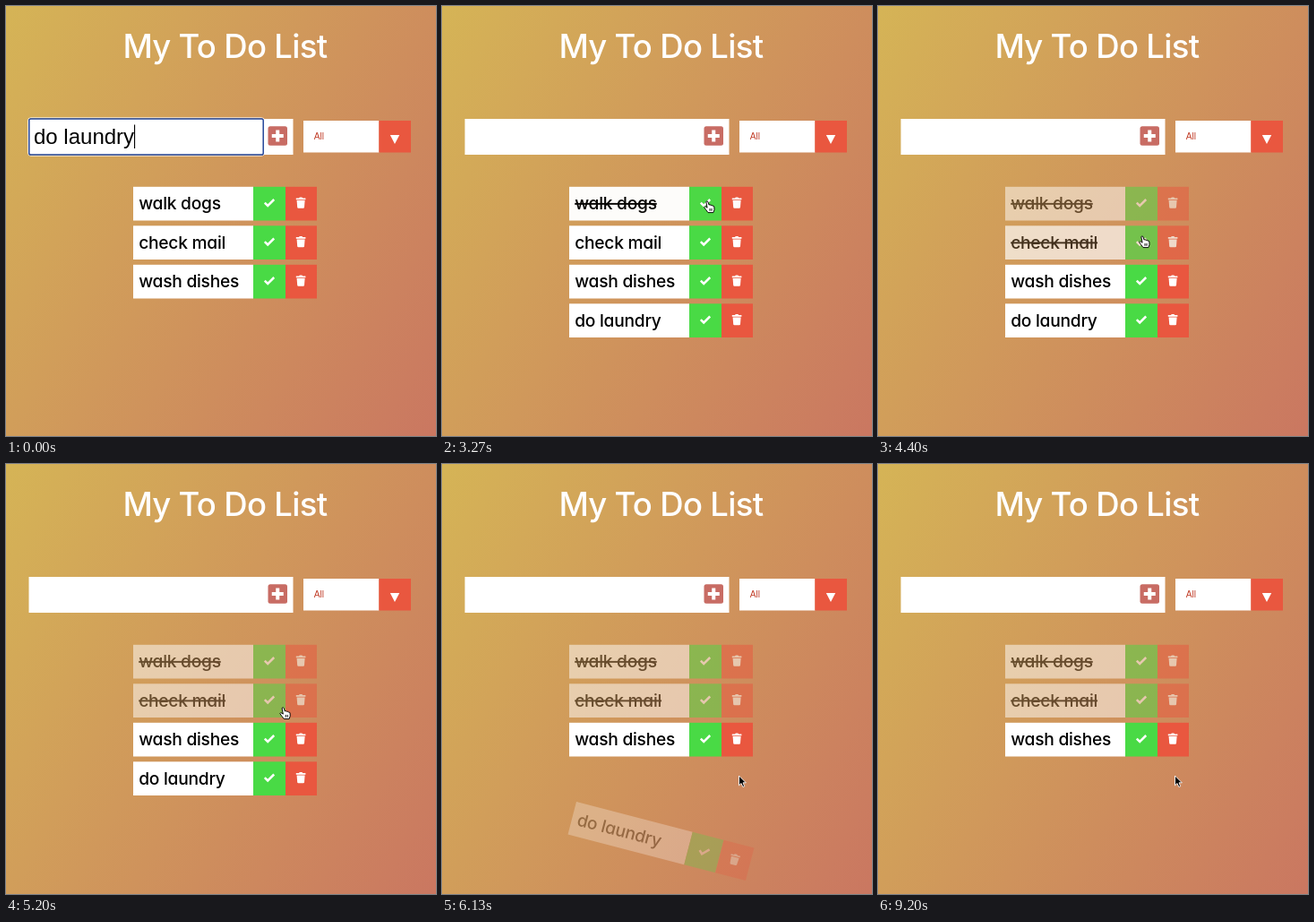
These frames come from a looping animation (480x480 px, 9.94 s). An HTML page:

```html
<!DOCTYPE html>
<html lang="en">
<head>
<meta charset="utf-8">
<title>My To Do List</title>
<style>
  html, body { margin: 0; width: 100%; height: 100%; overflow: hidden; }
  body { background: linear-gradient(120deg, #d5b456, #ca7761); }
  svg { display: block; width: 100%; height: 100%; }
  text { white-space: pre; }
  .round {
    font-family: Inter, "Open Sans", sans-serif;
    font-feature-settings: "cv11";
    font-optical-sizing: none;
    font-weight: 500;
  }
  .title { font-size: 36.5px; letter-spacing: -.7px; fill: #fff; text-anchor: middle; }
  .label { font-size: 19.2px; letter-spacing: -.25px; fill: #000; }
  .done .label { text-decoration: line-through; }
  .plain { font-family: "Liberation Sans", Arial, sans-serif; }
</style>
</head>
<body>
<svg viewBox="0 0 480 480">
  <defs>
    <g id="row">
      <rect width="134" height="37.7" fill="#fff"/>
      <rect x="134" width="36" height="37.7" fill="#49da45"/>
      <rect x="170" width="35" height="37.7" fill="#e9573f"/>
      <path d="M146.8 17.8L150.2 21.1L157.2 14.2" fill="none" stroke="#fff" stroke-width="2.5"/>
      <path d="M181.8 12.8h3.2l.8-1h2.6l.8 1h3.2v1.6h-10.6z M182.6 15.3h9l-.6 7.6q-.1 1.1-1.2 1.1h-5.4q-1.1 0-1.2-1.1z" fill="#fff"/>
    </g>
  </defs>

  <text class="round title" x="244.4" y="57.6">My To Do List</text>

  <rect x="25.5" y="126" width="295" height="40" fill="#fff"/>
  <rect x="292.5" y="134.3" width="21.5" height="21.5" rx="2.5" fill="#c86c64"/>
  <path d="M303.25 138.5v13M296.75 145h13" stroke="#fff" stroke-width="4"/>

  <g id="focus">
    <rect x="24.6" y="124.8" width="263.8" height="42.4" rx="3" fill="none" stroke="#fff" stroke-opacity=".85"/>
    <rect x="25.8" y="126" width="261.4" height="40" rx="1.8" fill="#fff" stroke="#25479b" stroke-width="1.5"/>
    <text id="typed" class="plain" x="31" y="154" font-size="24">do laundry</text>
    <rect id="caret" y="132.5" width="1.1" height="26.5"/>
  </g>

  <rect x="332" y="128" width="84.5" height="35.5" fill="#fff"/>
  <rect x="416.3" y="128" width="35.7" height="35.5" fill="#e9573f"/>
  <text class="plain" x="343.8" y="149.4" font-size="10.2" fill="#c2402b">All</text>
  <path d="M428.8 144h10.4l-5.2 10z" fill="#fff"/>

  <g id="rows"></g>

  <g id="pointer">
    <path id="arrow" d="M0 0V10.8L2.5 8.5L4.3 12.5L6.2 11.7L4.5 7.8H7.8Z" fill="#000" stroke="#fff" stroke-width=".9"/>
    <path id="hand" d="M-1.2 .5Q0-.8 1 .6L2 4Q3.2 3.2 4 4.4Q5.2 3.8 5.9 5Q7.2 4.6 7.8 6L8 9.2L6.9 12.6H1L-1.6 9.2L-3.4 6.6Q-2.9 5.2-1.4 6.2L.1 7.2Z M3 8v2.8M5 8v2.8" fill="#fff" stroke="#000" stroke-width=".95" stroke-linejoin="round"/>
    <path id="beam" d="M-2.2-6.5Q0-6.5 0-5Q0-6.5 2.2-6.5M0-5V5M-2.2 6.5Q0 6.5 0 5Q0 6.5 2.2 6.5" fill="none" stroke="#333"/>
  </g>
</svg>
<script>
const LOOP = 9940;
const FADE = 500, BLINK = 533;
const ADD = 730, BLUR = 3215, DROP = 5914, GONE = 6400, RELEASE = 6070;
const PITCH = 43.5, TOP = 201.8, LEFT = 142;
const tasks = [
  { name: "walk dogs", doneAt: 3235 },
  { name: "check mail", doneAt: 4210 },
  { name: "wash dishes" },
  { name: "do laundry", addedAt: ADD, dropAt: DROP }
];
// Pointer stops: time, x, y
const path = [
  [2130, 226, 150], [2500, 262, 178], [2930, 296, 218],
  [3650, 296, 218], [4070, 295, 257],
  [5070, 295, 257], [5400, 336, 300], [5730, 331.5, 348]
];

const $ = id => document.getElementById(id);
const show = (el, on) => el.setAttribute("visibility", on ? "visible" : "hidden");
const clamp = v => Math.min(1, Math.max(0, v));
const bez = (a, b, s) => 3 * a * s * (1 - s) ** 2 + 3 * b * s * s * (1 - s) + s ** 3;

// cubic-bezier(.25, .1, .25, 1)
function ease(x) {
  if (x <= 0 || x >= 1) return clamp(x);
  let lo = 0, hi = 1;
  for (let i = 0; i < 24; i++) {
    const mid = (lo + hi) / 2;
    if (bez(.25, .25, mid) < x) lo = mid; else hi = mid;
  }
  return bez(.1, 1, lo);
}

$("rows").innerHTML = tasks.map(task =>
  `<g><use href="#row"/><text class="round label" x="6.2" y="25.4">${task.name}</text></g>`
).join("");
const rows = [...$("rows").children];

function drawRow(row, task, i, t) {
  const { addedAt = 0, doneAt = Infinity, dropAt = Infinity } = task;
  const fall = ease((t - dropAt) / FADE);
  const fade = ease((t - doneAt) / FADE);
  const y = TOP + i * PITCH + 96 * fall;
  row.setAttribute("display", t >= addedAt && !(task.dropAt && t >= GONE) ? "inline" : "none");
  row.setAttribute("class", t >= doneAt ? "done" : "");
  row.setAttribute("opacity", (1 - fade / 2) * (1 - fall));
  row.setAttribute("transform", `translate(${LEFT} ${y}) rotate(${20 * fall} 102.5 18.8)`);
}

function pointerAt(t) {
  const next = path.findIndex(p => p[0] > t);
  if (next < 0) return path[path.length - 1].slice(1);
  const [t0, x0, y0] = path[next - 1], [t1, x1, y1] = path[next];
  const s = (t - t0) / (t1 - t0), k = s * s * (3 - 2 * s);
  return [x0 + (x1 - x0) * k, y0 + (y1 - y0) * k];
}

function pointerKind(x, y, t) {
  if (x < 288 && y > 126 && y < 166) return "beam";
  const slot = (y - TOP) / PITCH;
  const count = t < RELEASE ? 4 : 3;
  const onButton = x > 276 && x < 347 && slot >= 0 && slot < count && slot % 1 < .86;
  return onButton ? "hand" : "arrow";
}

function drawPointer(t) {
  const on = t >= path[0][0];
  const [x, y] = on ? pointerAt(t) : [0, 0];
  const kind = on ? pointerKind(x, y, t) : "";
  $("pointer").setAttribute("transform", `translate(${x} ${y})`);
  for (const id of ["arrow", "hand", "beam"]) show($(id), id === kind);
}

function draw(t) {
  const typing = t < ADD, focused = t < BLUR;
  const caretOn = typing ? t < ADD - BLINK : Math.floor((t - ADD) / BLINK) % 2 === 0;
  show($("focus"), focused);
  // Children inherit visibility unless they are hidden themselves
  show($("typed"), typing);
  show($("caret"), focused && caretOn);
  $("caret").setAttribute("x", typing ? 143 : 31.2);
  rows.forEach((row, i) => drawRow(row, tasks[i], i, t));
  drawPointer(t);
}

const start = performance.now();
function tick() {
  draw((performance.now() - start) % LOOP);
  requestAnimationFrame(tick);
}
tick();
</script>
</body>
</html>
```
